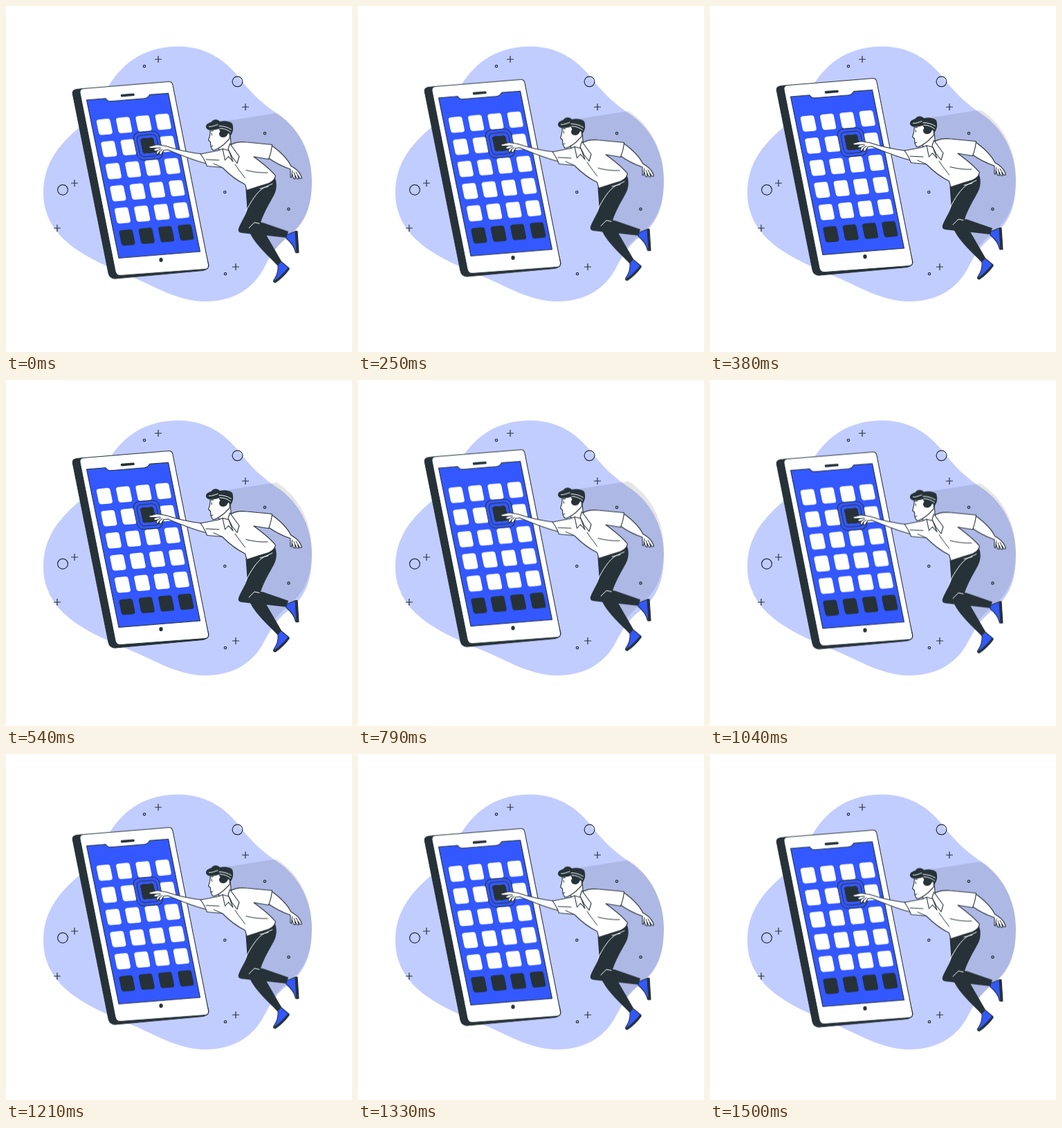
Write an HTML page that moves like this. It is 500 px wide and 500 px high and loops after 1540 ms.

```html
<!DOCTYPE html>
<html lang="en">
<head>
<meta charset="utf-8">
<title>Touch screen</title>
<style>
  :root { --ink: #263238; --blue: #3358ff; --pale: #c2cdff; }
  html, body { margin: 0; width: 100%; height: 100%; overflow: hidden; background: #fff; }
  svg { display: block; width: 100%; height: 100%; }
  .ink { fill: var(--ink); }
  .blue { fill: var(--blue); }
  .white { fill: #fff; }
  .edge { stroke: var(--ink); stroke-width: 1.1; stroke-linejoin: round; stroke-linecap: round; }
  .line { fill: none; stroke: var(--ink); stroke-width: 1; stroke-linecap: round; stroke-linejoin: round; }
  .light { stroke: #fff; }
  .thick { stroke-width: 3.6; }
  .decor { fill: none; stroke: var(--ink); stroke-width: 1.2; }
  .float { animation: float 1540ms linear -40ms infinite; }
  @keyframes float {
    0%, 100% { transform: translateY(.5px); }
    50% { transform: translateY(-9.5px); }
  }
</style>
</head>
<body>
<svg viewBox="0 0 500 500" xmlns="http://www.w3.org/2000/svg">
  <defs>
    <rect id="tile" x="-9.9" y="-11.2" width="19.8" height="22.4" rx="3.8"/>
    <g id="row">
      <use href="#tile"/>
      <use href="#tile" x="28.3"/>
      <use href="#tile" x="56.6"/>
      <use href="#tile" x="84.9"/>
    </g>
    <path id="plus" d="M-5 0H5M0-5V5"/>
    <circle id="dot" r="1.7"/>
    <circle id="ring" r="7.4"/>
  </defs>

  <path fill="var(--pale)" d="M250 58.5C294 59 320 82 339 106C356 128 372 142 391 155C424 176 442 213 442 252C442 292 432 314 407 334C386 350 379 368 371 382C353 413 323 427 288 427C248 427 213 404 183 392C150 378 111 362 88 341C66 322 54 298 54 270C54 229 75 202 104 177C125 158 133 138 150 113C172 78 205 58 250 58.5Z"/>

  <g class="decor">
    <use href="#plus" x="220" y="77"/>
    <use href="#plus" x="346" y="146"/>
    <use href="#plus" x="99" y="256"/>
    <use href="#plus" x="74" y="321"/>
    <use href="#plus" x="332" y="377"/>
    <use href="#dot" x="200" y="87"/>
    <use href="#dot" x="374" y="184"/>
    <use href="#dot" x="316.3" y="269"/>
    <use href="#dot" x="408.5" y="293.5"/>
    <use href="#dot" x="317" y="387"/>
    <use href="#ring" x="334.5" y="109.3"/>
    <use href="#ring" x="82" y="265.7"/>
  </g>

  <g class="float">
    <path opacity=".1" d="M320 166L391 155C424 176 442 213 442 252C442 292 432 314 407 334C400 340 394 346 388 353L364 314L380 262L340 225L322 200Z"/>

    <!-- phone -->
    <path class="ink edge" d="M112 119.5L102 120.5Q95 121.5 96.5 128L148 386Q150 395 159 394L284 382.5Q292 381.5 293 375L230 120Z"/>
    <path class="white edge" d="M112 119.5L235 109.5Q240 109 241 114.5L292.5 374Q293.5 380 288 380.5L166 389.5Q159.5 390 158 383.5L107 126Q106 120 112 119.5Z"/>
    <path class="blue edge" d="M116.5 136L144 133.7Q147 138.2 152 137.8L200 133.8Q205 133 207.5 128.4L234.5 126.2L280.5 355L163 364.5Z"/>
    <path class="line thick" d="M167.5 129.6L184 128.3"/>
    <ellipse class="ink" cx="224" cy="367" rx="2.7" ry="3.1"/>

    <!-- icons -->
    <g transform="matrix(1 -.087 .204 1 142.3 174.8)">
      <g class="white">
        <use href="#row"/>
        <use href="#row" y="32"/>
        <use href="#row" y="64"/>
        <use href="#row" y="96"/>
        <use href="#row" y="128"/>
      </g>
      <use class="ink" href="#row" y="160"/>
      <g transform="translate(56.6 32)">
        <use class="blue" href="#tile"/>
        <rect class="line" x="-18.7" y="-20" width="37.4" height="40" rx="9"/>
        <rect class="line" x="-14.2" y="-15.4" width="28.4" height="30.8" rx="6"/>
        <use class="ink" href="#tile"/>
      </g>
    </g>

    <!-- legs and shoes -->
    <path class="blue edge" d="M405 331L419 325.5L422.5 356.5L418.5 356.5C417 347 411 341 405 336Z"/>
    <path class="ink edge" d="M418 325.8L421 325.5L423 356.5L420 357Z"/>
    <path class="blue edge" d="M393 374L397 369L409 379L388 399.5L386.5 397C391 391 394 385 393 374Z"/>
    <path class="ink edge" d="M408 378.5L409.3 380.5C403 389 397 395 389 400L386.5 398.5C396 393 402 387 408 378.5Z"/>
    <path class="ink" d="M357 311L372 313.5L408 326L405 335L374 331.5L352 326Z"/>
    <path class="ink" d="M346.5 265L389 249C392 257 391 267 387 274C380 287 373 298 368 313L376 331L398 369L392.5 375.5C379 361 363 348 353 329.5L340 328Q334.5 327 336 322C340 311 346 304 348.5 295C348 284 347 275 346.5 265Z"/>
    <path class="line light" d="M346.5 297C354 283 362 269 373 262.5L385 257M367 264L379 261M351 321L359 313L366 314.5"/>

    <!-- far arm -->
    <path class="white edge" d="M383 201C394 209 407 221 411.5 231L417 234.5C422 238 426 243 427.5 249L425 249.5L421.5 244.5L423 250L420.5 250L417.5 244.5L418 250L415.5 249.5L413.5 243L412.5 248L411 247.5L411 236C399 232 388 226 378 219Z"/>
    <path class="line" d="M413 243L414 238M417.5 244.5L416 240.5M421.5 244.5L419 240"/>

    <!-- near arm -->
    <path class="white edge" d="M283 214C266 212 247 208 231 202.5L218 200.5L206.5 203.5Q206.5 205.5 209 205.8L217 205.5L213.5 207.5Q214 210 216.5 209.8L218.5 209.2L217 213.5Q219 215.5 220.5 213L222 210.5L221.5 214Q223.5 216 225 213.5L228 208.5L234 208C253 216 270 223 290 228Z"/>
    <path class="line" d="M217 205.5L223 205M218.5 209.2L223.5 206.8M222 210.5L226 207.5"/>

    <!-- neck and shirt -->
    <path class="white edge" d="M306 206L317 190L324 184L325 198L333 222L318 216Z"/>
    <path class="white edge" d="M324 201C331 197 340 196 348 197L384.500 200.5C384 208 382 215 379.5 221.5L358 218C369 226 381 235 389.5 245.5C388 253 380 257 373 258.5C364 261 356 264 348 266.5L345.5 258C333 252 322 243 312.5 233.5L290.5 231.5C288 225 285 219 281 214L307 209L313 206.5L319 216L325 220.5Z"/>
    <path class="line" d="M312.5 233.5L300 228M289 222L308 223M347 237.5C357 240 367 241.5 378 241M331 229C337 238 342 244 345.5 249"/>
    <path class="white edge" d="M313 206.5L316.5 223L321.5 217.5L328 225L322 209Z"/>
    <path class="white edge" d="M323.5 199L337 217.5L334 227.5L326.5 218L321 207Z"/>

    <!-- head -->
    <path class="white edge" d="M295 178C295.5 184 294.5 189 292.5 194L295.5 196.5C295.5 201 296.5 206 299 208.5C304 209 310 204 315 200L323 192L324 176L304 173Z"/>
    <path class="ink" d="M289 176C288 169.5 295 169 297 167.5C300 163 306 163.5 309 167C316 165.5 323 166.5 327 170C329 176 328.5 182 325 187L321 184C320 187 318 189.500 315 190C309 191 306 185 309.5 181.5L307.5 177.5C301 180 292 181.5 289 176Z"/>
    <path class="line light" d="M293.5 174.5C298 175 302 172.5 306 171.5M308 173.5C314 173.5 320 175 325.5 178.5M309 177C315 177 320 179 324.5 182.5"/>
    <path class="line" d="M297 184L297.5 187M296 181L299.5 180.5M296 203L299 202"/>
  </g>
</svg>
</body>
</html>
```
